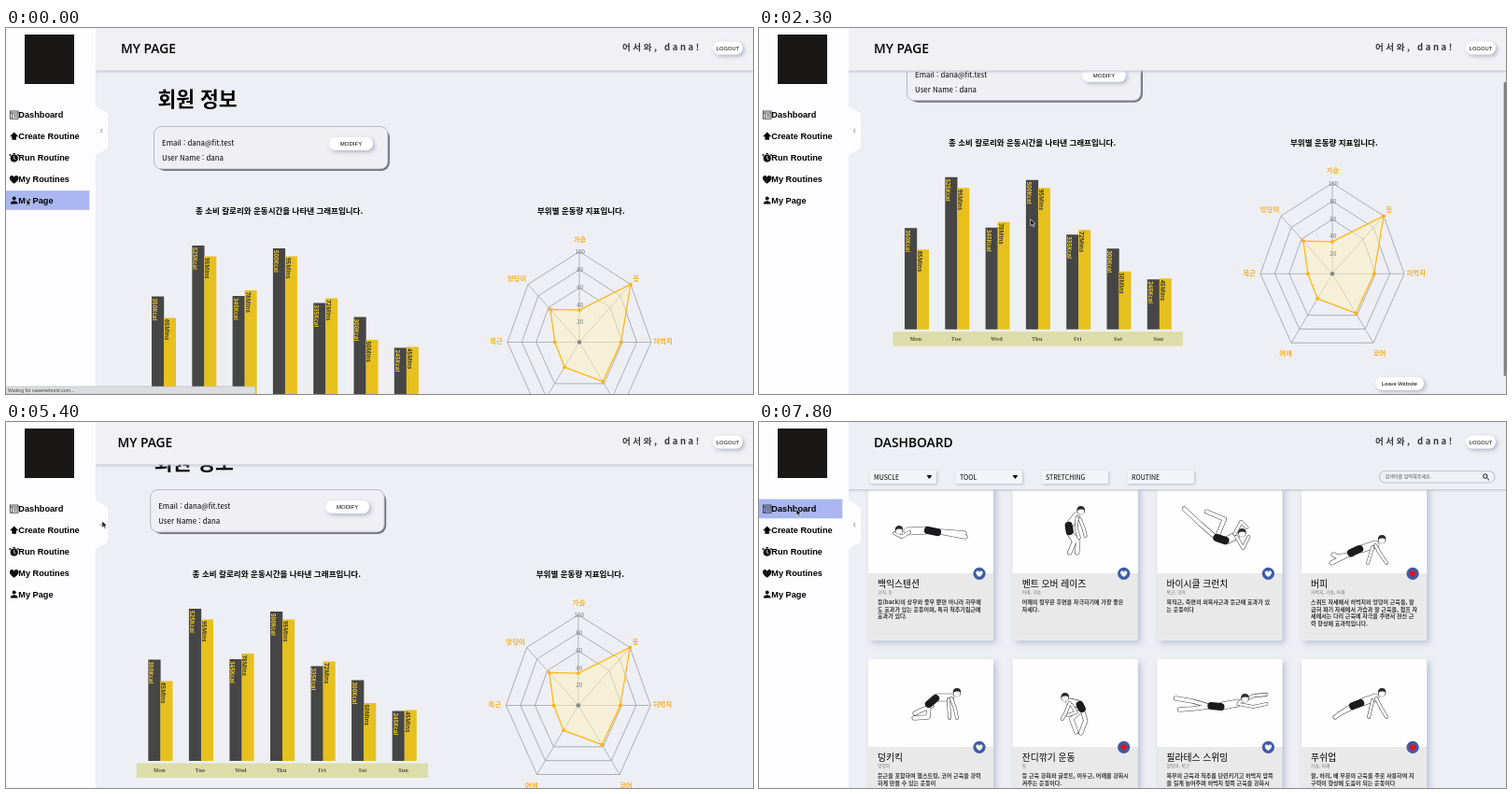
An HTML page for the animation above (7.9 s loop, 800 px wide and 392 px high).

```html
<!DOCTYPE html>
<html lang="ko">
<head>
<meta charset="utf-8">
<title>My Page</title>
<style>
  html, body { margin: 0; width: 100%; height: 100%; overflow: hidden; background: #eeeff4; }
  svg { display: block; width: 800px; height: 392px; }
  text { font-family: "Noto Sans CJK KR", "Noto Sans CJK", "Noto Sans", sans-serif; white-space: pre; }
  .head { font-family: "Open Sans", "Noto Sans", sans-serif; font-weight: 600; }
  .ui { font-family: "Liberation Sans", Arial, sans-serif; }
  .bar { font-family: "Noto Sans", "Open Sans", sans-serif; font-weight: 700; }
  .day { font-family: "Noto Serif", serif; font-weight: 600; }
  .soft { filter: drop-shadow(2px 2px 2px #b4b6c4); }
  .low { filter: drop-shadow(1px 1px 1.5px #b9bbc6); }
  .card { filter: drop-shadow(3px 3px 3px #b9c2d8); }
  .limb { fill: none; stroke-linecap: round; stroke-linejoin: round; }
</style>
</head>
<body>
<svg id="stage" viewBox="0 0 800 392"></svg>
<script>
const LOOP = 7900, STEP = 100;

const rect = (x, y, w, h, fill, more = '') =>
  `<rect x="${x}" y="${y}" width="${w}" height="${h}" fill="${fill}" ${more}/>`;
const path = (d, more = '') => `<path d="${d}" ${more}/>`;
const dot = (x, y, r, fill) => `<circle cx="${x}" cy="${y}" r="${r}" fill="${fill}"/>`;
// y is the middle of the line
const text = (x, y, size, str, more = '') =>
  `<text x="${x}" y="${y}" dy=".36em" font-size="${size}" ${more}>${str}</text>`;
const pill = (x, y, w, h, label, size) =>
  rect(x, y, w, h, '#fff', `rx="${h / 2}" class="soft"`) +
  text(x + w / 2, y + h / 2, size, label, 'class="ui" text-anchor="middle"');
const heart = (x, y, s, fill) =>
  path('M0 4.6C-2.5 2.6-5 .6-5-1.8-5-5-1.2-5.4 0-2.8 1.2-5.4 5-5 5-1.8 5 .6 2.5 2.6 0 4.6Z',
    `fill="${fill}" transform="translate(${x} ${y}) scale(${s})"`);

// ---------- my page ----------
function infoBox() {
  return text(162.5, 76, 21.5, '회원 정보', 'font-weight="700"') +
    rect(161, 108, 250, 45, '#74757a', 'rx="9"') +
    rect(158.5, 105.5, 250.5, 45.5, '#efeff4', 'rx="8" stroke="#a9aab0" stroke-width=".8"') +
    text(167, 123, 7.9, 'Email : dana@fit.test') +
    text(167, 139, 7.9, 'User Name : dana') +
    pill(346, 117, 47, 14, 'MODIFY', 6);
}

const DAYS = [
  ['Mon', 350, 65, 287.5, 310.5], ['Tue', 525, 95, 233, 244.5], ['Wed', 345, 78, 287, 281],
  ['Thu', 500, 95, 236, 244.5], ['Fri', 335, 72, 294.5, 289.5], ['Sat', 300, 50, 309.5, 334],
  ['Sun', 245, 45, 342.5, 341.5]
];

function bars() {
  const side = (x, y, str, fill) =>
    `<g transform="translate(${x} ${y}) rotate(90)">${text(0, 0, 6.3, str, `class="bar" fill="${fill}"`)}</g>`;
  let s = text(203, 196, 8.53, '총 소비 칼로리와 운동시간을 나타낸 그래프입니다.', 'font-weight="700"') +
    rect(143.5, 398.5, 310.5, 15.5, '#dcdda8');
  DAYS.forEach(([day, kcal, mins, top, top2], i) => {
    const x = 169 + i * 43.3;
    s += rect(x - 13, top, 13.2, 396 - top, '#464646') +
      rect(x, top2, 13, 396 - top2, '#e7c01e') +
      side(x - 9.8, top + 2, kcal + 'Kcal', '#e9c327') +
      side(x + 3.2, top2 + 1.5, mins + 'Mins', '#3c3a30') +
      text(x - 1, 406, 5.6, day, 'class="day" fill="#55553f" text-anchor="middle"');
  });
  return s;
}

function radar() {
  const cx = 614, cy = 336.5;
  const spokes = [[0, -97], [55, -62], [77, 0], [44, 74], [-44, 74], [-77, 0], [-55, -62]];
  const values = [.355, 1, .58, .57, .36, .34, .565];
  const at = (p, k) => [cx + p[0] * k, cy + p[1] * k];
  const poly = (f, more) => `<polygon points="${spokes.map((p, i) => at(p, f(i))).join(' ')}" ${more}/>`;
  let s = text(569, 196, 8.53, '부위별 운동량 지표입니다.', 'font-weight="700"');
  for (const k of [.6, .8, 1]) s += poly(() => k, 'fill="none" stroke="#9c9da1" stroke-width=".8"');
  for (const p of spokes) s += path(`M${cx} ${cy}L${at(p, 1)}`, 'stroke="#a3a4a8" stroke-width=".8"');
  s += poly(i => values[i], 'fill="#fff0b8" fill-opacity=".48" stroke="#fbba1b" stroke-width="1.3"');
  spokes.forEach((p, i) => { s += dot(...at(p, values[i]), 1.9, '#fbb314'); });
  s += dot(cx, cy, 2.3, '#85868a');
  for (let k = 1; k <= 5; k++)
    s += text(cx + .8, cy - 2.5 - 18.8 * k, 6.3, k * 20, 'fill="#77787c" text-anchor="middle"');
  const names = [['가슴', 614.5, 226], ['등', 675, 268], ['허벅지', 703.5, 335.5], ['코어', 664.5, 422],
    ['어깨', 564, 422], ['복근', 525, 335.5], ['엉덩이', 547, 268]];
  for (const [n, x, y] of names)
    s += text(x, y, 7.4, n, 'fill="#f6b02a" font-weight="700" text-anchor="middle"');
  return s;
}

// ---------- dashboard ----------
// body parts are drawn relative to the card's corner
const CARDS = [
  { name: '백익스텐션', part: '코어, 등',
    lines: ['등(back)의 상부와 중부 뿐만 아니라 하부에', '도 효과가 있는 운동이며, 특히 척추기립근에', '효과가 있다.'],
    head: [33, 48], torso: 'M42 49L62 48', shorts: 'M64 48L74 50',
    legs: 'M77 50L104 55M77 49L103 51', arms: 'M44 50L36 55L28 51' },
  { name: '벤트 오버 레이즈', part: '어깨, 가슴',
    lines: ['어깨의 뒷부분 후면을 자극하기에 가장 좋은', '자세다.'],
    head: [73, 27], torso: 'M68 33L61 42', shorts: 'M60 43L61 49',
    legs: 'M60 51L66 60L61 72M63 51L70 60L69 72', arms: 'M69 34L68 46L71 56M72 36L76 46L78 54' },
  { name: '바이시클 크런치', part: '복근, 코어',
    lines: ['복직근, 측면의 외복사근과 둔근에 효과가 있', '는 운동이다'],
    head: [91, 51], torso: 'M84 54L74 59', shorts: 'M73 59L64 56',
    legs: 'M61 54L46 41L29 25M65 53L72 36L53 28', arms: 'M85 55L92 67L98 55M83 52L90 39L96 45' },
  { name: '버피', part: '허벅지, 가슴, 어깨', liked: true,
    lines: ['스쿼트 자세에서 허벅지와 엉덩이 근육을, 팔', '굽혀 펴기 자세에서 가슴과 팔 근육을, 점프 자', '세에서는 다리 근육에 자극을 주면서 전신 근', '력 향상에 효과적입니다.'],
    head: [86, 58], torso: 'M79 63L64 68', shorts: 'M62 68L53 72',
    legs: 'M52 73L32 83M54 74L38 76L34 74', arms: 'M79 64L84 73L91 83M76 66L71 83' },
  { name: '덩키킥', part: '엉덩이',
    lines: ['둔근을 포함하여 햄스트링, 코어 근육을 강력', '하게 만들 수 있는 운동이'],
    head: [95, 36], torso: 'M88 41L74 41', shorts: 'M72 42L65 48',
    legs: 'M65 51L64 62L49 63M68 50L56 55L50 58', arms: 'M89 42L93 53L95 63M86 43L87 63' },
  { name: '잔디깎기 운동', part: '등', liked: true,
    lines: ['등 근육 강화와 글루트, 이두근, 어깨를 강화시', '켜주는 운동이다.'],
    head: [56, 41], torso: 'M61 46L70 48', shorts: 'M72 49L74 53',
    legs: 'M73 55L63 64L68 78M75 56L78 66L73 79', arms: 'M61 47L57 57L53 64M63 49L68 57L59 60' },
  { name: '필라테스 스위밍', part: '엉덩이, 복근',
    lines: ['복부의 근육과 척추를 단련키기고 허벅지 앞쪽', '을 길게 늘어주며 허벅지 뒷쪽 근육을 강화시'],
    head: [94, 42], torso: 'M86 47L70 50', shorts: 'M68 51L58 50',
    legs: 'M55 50L38 45L20 42M55 51L38 53L24 54', arms: 'M87 48L103 51L117 48M88 46L104 39L117 38' },
  { name: '푸쉬업', part: '가슴, 어깨', liked: true,
    lines: ['팔, 허리, 배 부분의 근육을 주로 사용하여 지', '구력이 향상에 도움이 되는 운동이다'],
    head: [86, 36], torso: 'M79 41L65 46', shorts: 'M63 47L55 50',
    legs: 'M52 51L36 62M54 52L41 58', arms: 'M80 42L85 52L91 62M76 44L72 62' }
];

function figure({ head: [x, y], torso, shorts, legs, arms }) {
  const line = (d, color, w) => path(d, `class="limb" stroke="${color}" stroke-width="${w}"`);
  const skin = (d, w) => line(d, '#444', w) + line(d, '#fff', w - 1.1);
  return skin(legs, 5) + skin(torso, 8.5) + line(shorts, '#1b1b1d', 8.2) + skin(arms, 3.8) +
    dot(x, y, 4.3, '#333') + dot(x, y + .5, 3.5, '#fff') +
    path(`M${x - 4.2} ${y}q0-5 4.2-5t4.2 4.4q-4-2-8.4 .6z`, 'fill="#2a2a2a"');
}

function card(c, i) {
  const x = 117 + (i % 4) * 154.7, y = 68 + Math.floor(i / 4) * 186;
  return `<g transform="translate(${x} ${y})"><g class="card">` +
    rect(0, 0, 134, 166, '#e9e9ea') + '</g>' + rect(0, 0, 134, 94, '#fefefe') + figure(c) +
    dot(119, 94.3, 6.6, '#3f5ba6') + heart(119, 94.8, .72, c.liked ? '#e8101c' : '#fff') +
    text(10, 105, 9.8, c.name, 'font-weight="500"') + text(10, 114.3, 4.8, c.part, 'fill="#777"') +
    c.lines.map((l, n) => text(10, 125 + n * 7.5, 6.05, l, 'font-weight="700" fill="#333"')).join('') + '</g>';
}

function filters() {
  let s = rect(90, 0, 710, 72, '#eeeff4', 'class="low"');
  ['MUSCLE', 'TOOL', 'STRETCHING', 'ROUTINE'].forEach((n, i) => {
    const x = 118.5 + i * 92;
    s += rect(x, 52, 71.5, 14, '#f3f4f8', 'rx="1.5" class="low"') + text(x + 4.5, 59, 7, n);
    if (i < 2) s += path(`M${x + 61} 57h5.8l-2.9 4z`);
  });
  return s + rect(664.5, 52.5, 123.5, 12.5, '#f0f1f5', 'rx="6.2" stroke="#c3c5ce" stroke-width="1.2"') +
    text(670.5, 58.5, 5.1, '검색어를 입력해주세요.', 'fill="#555"') +
    path('M779.6 60l2.4 2.4M780 58a2.2 2.2 0 1 1-4.4 0a2.2 2.2 0 1 1 4.4 0', 'fill="none" stroke="#111" stroke-width="1"');
}

// ---------- frame around the pages ----------
function sidebar() {
  const thin = 'fill="none" stroke="#222" stroke-width=".8"';
  const icons = rect(4.4, 89, 8.6, 8.2, 'none', 'stroke="#222" stroke-width=".8"') +
    path('M4.4 91h8.6M6.6 91v6M8 93h4M8 95h4', thin) +
    path('M8.7 111.4l4.6 4.8h-2.3v3.6h-4.6v-3.6H4.1z') +
    dot(8.7, 139.6, 4.1, '#111') +
    path('M5 135.2l-1.3 1.6M12.4 135.2l1.3 1.6M7.5 134.6h2.4', 'stroke="#111" stroke-width="1.4"') +
    path('M8.7 137v3l1.6 1', 'fill="none" stroke="#fff" stroke-width=".8"') +
    heart(8.7, 162.4, .95, '#111') +
    dot(8.7, 182.4, 2, '#111') + path('M4.8 188.6c0-4.4 7.8-4.4 7.8 0z');
  const labels = ['Dashboard', 'Create Routine', 'Run Routine', 'My Routines', 'My Page'];
  return path('M95 83.5Q97 84 99 86L106 89.5Q109 91 109 95V125Q109 129 106 130.5L99 134Q97 136 95 136.5Z', 'fill="#fdfdff"') +
    path('M103.2 107.8l-1.8 2.2 1.8 2.2', 'fill="none" stroke="#777" stroke-width=".8"') +
    rect(-4, 0, 100, 392, '#fdfdff') +
    rect(20, 7, 53, 53, '#191817') +
    rect(-4, 0, 93.3, 20.6, '#a9b6f0', 'id="mark"') + icons +
    labels.map((n, i) => text(13.3, 93 + i * 22.9, 9.2, n, 'class="ui" font-weight="700"')).join('');
}

const id = n => document.getElementById(n);
id('stage').innerHTML =
  rect(0, 0, 800, 392, '#eeeff4') +
  `<g id="mine"><g id="scroll"><g id="info">${infoBox()}</g><g id="charts">${bars()}${radar()}</g>` +
  pill(660, 447, 52, 14, 'Leave Website', 5.75) + '</g>' +
  rect(90, 0, 710, 45.5, '#f0f0f5', 'class="low"') + '</g>' +
  `<g id="dash">${CARDS.map(card).join('')}${filters()}</g>` +
  text(123, 22.5, 13.8, '', 'class="head" id="title"') +
  text(660, 20.5, 9.5, '어서와, dana!', 'letter-spacing="2.6" font-weight="700" fill="#3a3a3c"') +
  pill(757, 14.5, 32, 14, 'LOGOUT', 5.75) +
  `<g id="side">${sidebar()}</g>` +
  rect(797.6, 0, 2.4, 315, '#7f8084', 'rx="1.2" id="thumb"') +
  `<g id="status">${rect(0, 384, 267, 8, '#dcdde0', 'stroke="#b5b6ba" stroke-width=".6"')}` +
  text(2, 388.2, 5.2, 'Waiting for savemehomt.com...', 'class="ui" fill="#444"') + '</g>' +
  '<g id="cursor">' +
  path('M0 0V7.2L1.7 5.7L2.9 8.4L4.1 7.8L2.9 5.3H5.2Z', 'id="arrow" fill="#111" stroke="#fff" stroke-width=".6"') +
  path('M-1.2-3.5H1.2M0-3.5V3.5M-1.2 3.5H1.2', 'id="beam" fill="none" stroke="#333" stroke-width=".7"') + '</g>';

// ---------- motion: [time, value...] ----------
const SCROLL = [[0, 0], [350, 0], [1000, 42], [1250, 42], [1800, 75], [2250, 75], [2800, 0], [3400, 0], [4100, 33]];
const BAR = [[0, 0], [350, 0], [450, 1], [2600, 1], [2900, .1], [3000, 0], [3400, 0], [3500, 1], [4600, 1], [4900, 0]];
const POINTER = [[0, 22, 183], [200, 22, 183], [800, 290, 205], [1800, 291, 205], [2200, 291, 205],
  [2800, 287, 200], [4200, 287, 200], [5000, 103, 106], [5500, 103, 106], [5900, 5, 112], [6700, 5, 112], [7050, 40, 93]];
const LAYOUT = [[0, 0], [5000, 0], [5200, 4], [6850, 4], [7050, 0]];
const SIDE = [[0, 0], [5450, 0], [5600, 4], [6850, 4], [7050, 0]];

function at(track, t) {
  const n = track.findIndex(k => k[0] > t);
  if (n < 0) return track[track.length - 1].slice(1);
  const a = track[n - 1], b = track[n];
  const p = (t - a[0]) / (b[0] - a[0]), e = p * p * (3 - 2 * p);
  return a.slice(1).map((v, i) => v + (b[i + 1] - v) * e);
}

const show = (n, on) => id(n).setAttribute('display', on ? 'inline' : 'none');
const move = (n, x, y = 0) => id(n).setAttribute('transform', `translate(${x} ${y})`);

function draw(t) {
  const dash = t >= 7300;
  const [scroll] = at(SCROLL, t), [shift] = at(LAYOUT, t), [slide] = at(SIDE, t), [x, y] = at(POINTER, t);
  show('mine', !dash);
  show('dash', dash);
  id('title').textContent = dash ? 'DASHBOARD' : 'MY PAGE';
  move('title', -shift * .9);
  move('scroll', 0, -scroll);
  move('info', -shift * .95);
  // the charts fill the width left beside the menu
  const k = 1 + shift / 704;
  id('charts').setAttribute('transform', `translate(${800 * (1 - k)} 0) scale(${k} 1)`);
  move('side', -slide);

  id('thumb').setAttribute('y', scroll * .79);
  id('thumb').setAttribute('opacity', dash ? 0 : at(BAR, t)[0]);
  show('status', t < 500);

  const row = Math.floor((y - 82) / 22.9);
  show('mark', x < 89 && row >= 0 && row < 5);
  id('mark').setAttribute('y', 82.6 + row * 22.9);
  const typing = t >= 2800 && t < 3400;
  show('beam', typing);
  show('arrow', !typing);
  move('cursor', x, y);
}

const start = performance.now();
function tick() {
  const t = (performance.now() - start) % LOOP;
  draw(Math.floor(t / STEP) * STEP);
  requestAnimationFrame(tick);
}
tick();
</script>
</body>
</html>
```
